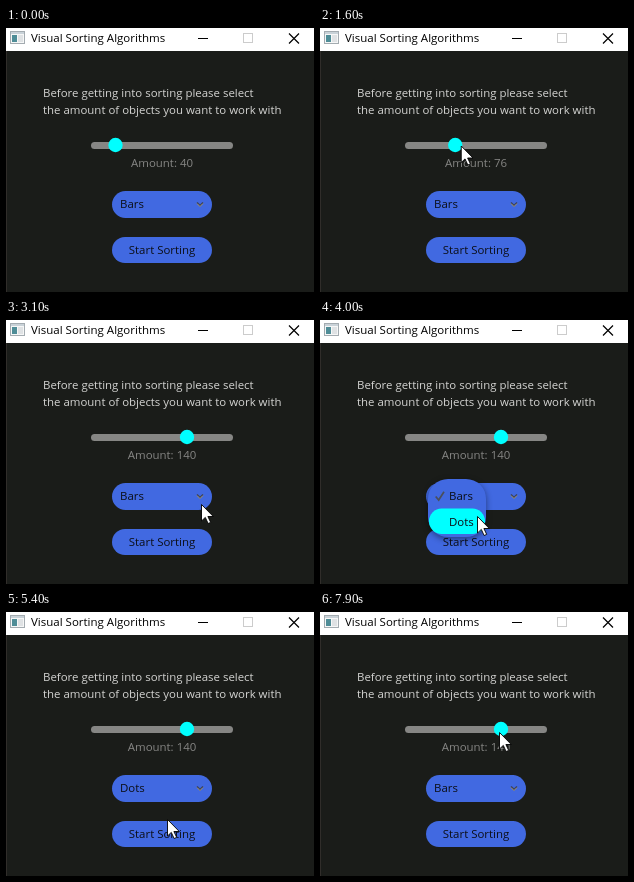
Write an HTML page that moves like this. It is 308x264 px and loops after 8 s.

```html
<!DOCTYPE html>
<html lang="en">
<head>
<meta charset="utf-8">
<title>Visual Sorting Algorithms</title>
<style>
  html, body { margin: 0; width: 100%; height: 100%; overflow: hidden; background: #1a1c19; }
  svg { display: block; width: 308px; height: 264px; }
  text { font: 11.45px "Open Sans", "Noto Sans", sans-serif; fill: #0c0f18; white-space: pre; }
  .mid { text-anchor: middle; }
  .title { font-size: 11.5px; fill: #000; }
  .info text { fill: #d4d4d2; }
  #amount { fill: #868684; }
  .blue { fill: #4169e1; }
  .hover { fill: #0ff; }
  .line { fill: none; stroke: #000; }
  #popup { filter: drop-shadow(0 2px 3px rgba(0, 0, 0, .45)); }
</style>
</head>
<body>
<svg viewBox="0 0 308 264">
  <rect width="308" height="264" fill="#1a1c19"/>
  <rect y="23" width="1" height="241" fill="#302d2a"/>

  <rect width="308" height="23" fill="#fff"/>
  <rect x="4.5" y="3.5" width="14" height="12" fill="#f6f7f7" stroke="#a3abb0"/>
  <rect x="5" y="4" width="13" height="2" fill="#c9d2d8"/>
  <rect x="6" y="7" width="5" height="7" fill="#4f8d97"/>
  <rect x="12" y="7" width="5" height="7" fill="#dfe2e4"/>
  <text class="title" x="25" y="14">Visual Sorting Algorithms</text>
  <path class="line" d="M192 10.5H202M283 5.5L293 15.5M293 5.5L283 15.5" stroke-width="1.2"/>
  <rect class="line" x="237.5" y="5.5" width="9" height="9" style="stroke:#ccc"/>

  <g class="info">
    <text x="37" y="69">Before getting into sorting please select</text>
    <text x="37" y="86">the amount of objects you want to work with</text>
  </g>

  <rect x="85" y="114" width="142" height="7" rx="3.5" fill="#868684"/>
  <circle id="thumb" cy="117" r="7.2" fill="#0ff"/>
  <text id="amount" class="mid" x="156" y="139"></text>

  <rect class="blue" x="106" y="163" width="100" height="27" rx="13.5"/>
  <text id="choice" x="114" y="180"></text>
  <path class="line" d="M191 174.5L194 177.5L197 174.5" style="stroke:#39405c;stroke-width:1.6"/>
  <path class="line" d="M191 175.5L194 178.5L197 175.5" style="stroke:#b3a273;stroke-width:.9"/>

  <rect class="blue" x="106" y="209" width="100" height="26" rx="13"/>
  <text class="mid" x="156" y="226">Start Sorting</text>

  <g id="popup">
    <rect class="blue" x="108" y="-4" width="58" height="58" rx="20"/>
    <rect class="cell" x="109" y="0" width="56" height="25.5" rx="12.7"/>
    <rect class="cell" x="109" y="25.5" width="56" height="25.5" rx="12.7"/>
    <text x="129" y="17">Bars</text>
    <text x="129" y="43">Dots</text>
    <path id="check" class="line" d="M115.7 13.5L118.7 17L124 8.7" stroke-width="1.7"/>
  </g>

  <path id="cursor" d="M0 0V16.5L3.8 12.9L6.6 19L9.2 17.9L6.4 12H11.8Z" fill="#fff" stroke="#000" stroke-width=".9"/>
</svg>
<script>
const LOOP = 8000, TICK = 100, ROW = 25.5;
const $ = id => document.getElementById(id);
const cells = document.querySelectorAll('.cell');

// [time, value]: slider drag
const drag = [[1200, 40], [1600, 76], [2100, 117], [2400, 140]];
// [time, x, y]: pointer before and after the drag
const approach = [[100, 258, 13], [500, 216, 68], [900, 130, 113], [1100, 115.5, 118]];
const tour = [
  [2500, 187, 118], [3000, 195.5, 184.5], [3400, 195.5, 184.5], [3900, 157.5, 196.5],
  [4800, 157.5, 196.5], [5400, 161.5, 207.5], [5800, 174, 215], [6050, 174, 215],
  [6500, 150.5, 179.5], [7200, 150.5, 179.5], [7900, 179.5, 120.5]
];
// Popup open spans, with the selected row, which lies over the combo box
const menus = [
  { from: 3300, to: 4200, row: 0 },
  { from: 6500, to: 7000, row: 1 }
];

const smooth = k => k * k * (3 - 2 * k);
const linear = k => k;

function along(keys, t, ease) {
  if (t <= keys[0][0]) return keys[0].slice(1);
  for (let i = 1; i < keys.length; i++) {
    const [a, b] = [keys[i - 1], keys[i]];
    if (t <= b[0]) {
      const k = ease((t - a[0]) / (b[0] - a[0]));
      return a.slice(1).map((v, j) => v + (b[j + 1] - v) * k);
    }
  }
  return keys[keys.length - 1].slice(1);
}

function pointer(t, thumbX) {
  if (t < 1200) return along(approach, t, smooth);
  if (t < 2500) return [thumbX + 6, 118];
  return along(tour, t, smooth);
}

function draw(t) {
  const [value] = along(drag, t, linear);
  const thumbX = 80.9 + .715 * value;
  const [x, y] = pointer(t, thumbX);

  $('thumb').setAttribute('cx', thumbX);
  $('amount').textContent = 'Amount: ' + Math.round(value);
  $('choice').textContent = t >= 4200 && t < 7000 ? 'Dots' : 'Bars';
  $('cursor').setAttribute('transform', `translate(${x} ${y})`);
  $('cursor').style.display = t < 100 ? 'none' : '';

  const menu = menus.find(m => t >= m.from && t < m.to);
  $('popup').style.display = menu ? '' : 'none';
  if (menu) {
    const top = 163 - menu.row * ROW;
    const over = x < 165 ? Math.floor((y - top) / ROW) : -1;
    cells.forEach((c, i) => c.setAttribute('class', i === over ? 'cell hover' : 'cell blue'));
    $('popup').setAttribute('transform', `translate(0 ${top})`);
    $('check').setAttribute('transform', `translate(0 ${menu.row * ROW})`);
    $('check').style.stroke = over === menu.row ? '#fff' : '#4a4f5c';
  }
}

const start = performance.now();
function frame() {
  const t = (performance.now() - start) % LOOP;
  draw(Math.floor(t / TICK) * TICK);
  requestAnimationFrame(frame);
}
frame();
</script>
</body>
</html>
```
